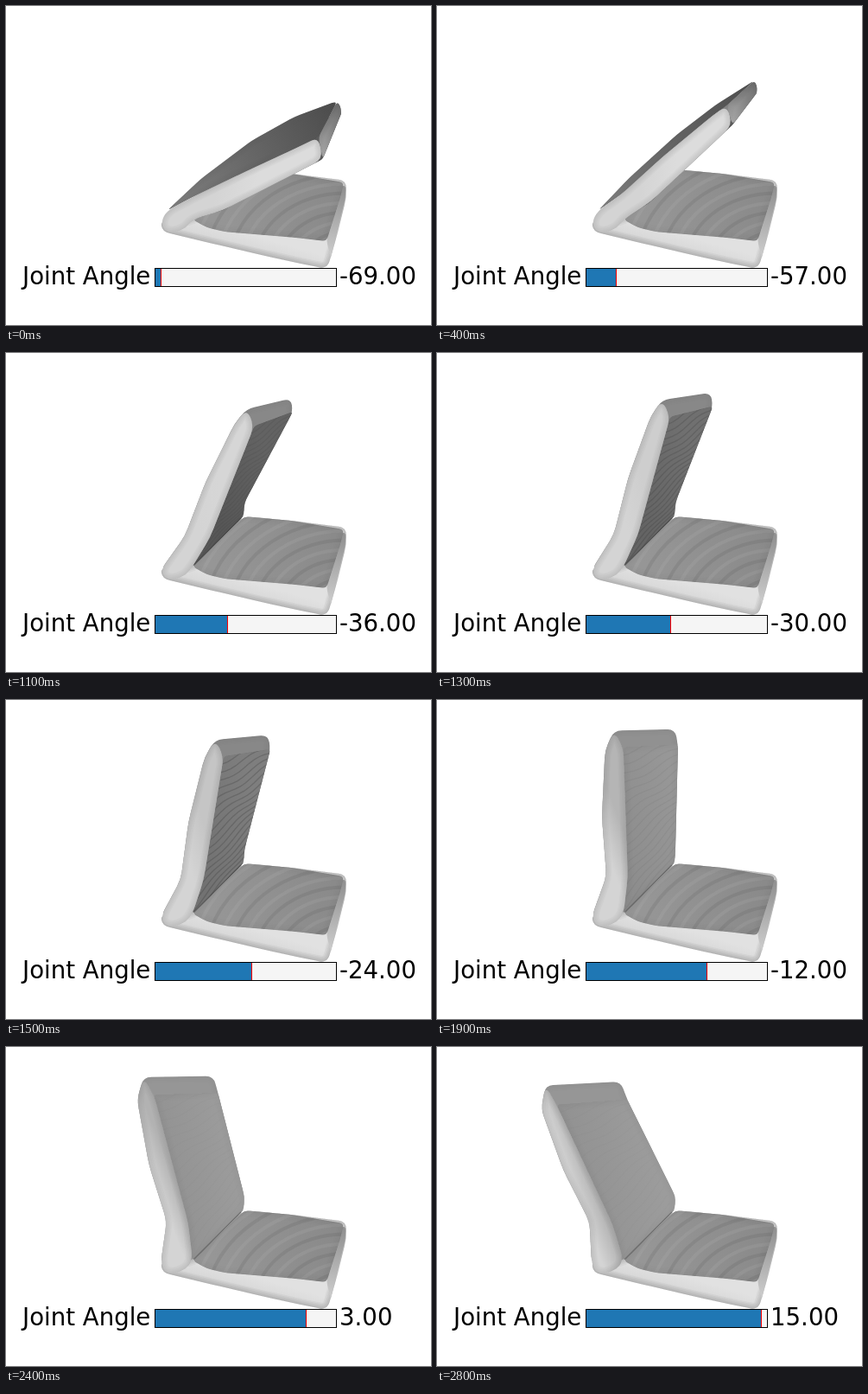
Recreate the animation shown at these times as an HTML page with a canvas. Size 492 by 369 pixels, loop 2.9 s.

```html
<!DOCTYPE html>
<html lang="en">
<head>
<meta charset="utf-8">
<title>Joint Angle</title>
<style>
  html, body { margin: 0; width: 100%; height: 100%; overflow: hidden; background: #fff; }
  canvas { display: block; width: 492px; height: 369px; }
</style>
</head>
<body>
<canvas id="stage"></canvas>
<script>
const STEP = 100, STEPS = 29;
const canvas = document.getElementById('stage');
const ctx = canvas.getContext('2d');
const ratio = window.devicePixelRatio || 1;
canvas.width = 492 * ratio;
canvas.height = 369 * ratio;
ctx.scale(ratio, ratio);

const HINGE = [179, 251], FOOT = [186, 237], FOLD = [216, 247];
const CORNER = [275, 189], FAR_LOW = [276, 173];

const gray = (n, a = 1) => `rgba(${n},${n},${n},${a})`;
const mix = (a, b, u) => a + (b - a) * u;
const between = (p, q, u) => [mix(p[0], q[0], u), mix(p[1], q[1], u)];

// Point on the line p-q, pushed sideways by d
function beside(p, q, u, d) {
  const [x, y] = between(p, q, u);
  const dx = q[0] - p[0], dy = q[1] - p[1], len = Math.hypot(dx, dy);
  return [x - d * dy / len, y + d * dx / len];
}

// A point turning on an ellipse about a pivot
const swing = (pivot, up, out) => t =>
  [0, 1].map(k => pivot[k] + up[k] * Math.cos(t) + out[k] * Math.sin(t));

const outerTop = swing([216, 251], [-56, -192], [-160, 24]);
const nearCap = swing([221, 238], [-53, -204], [-171, 14]);
const innerTop = swing([228, 275], [-48, -221], [-167, 20]);
const farCap = swing([264, 167], [-17, -134], [-135, 10]);
const farTop = swing([281, 184], [-29, -132], [-127, 16]);

// Closed polygon with its corners cut to curves
function rounded(pts, d) {
  const path = new Path2D();
  const toward = (p, q) => between(p, q, Math.min(0.5, d / (Math.hypot(q[0] - p[0], q[1] - p[1]) || 1)));
  pts.forEach((p, i) => {
    const start = toward(p, pts[(i + pts.length - 1) % pts.length]);
    const end = toward(p, pts[(i + 1) % pts.length]);
    if (i) path.lineTo(...start); else path.moveTo(...start);
    path.quadraticCurveTo(...p, ...end);
  });
  path.closePath();
  return path;
}

function solid(pts, d, fill, edge = 0, detail) {
  const path = rounded(pts, d);
  ctx.save();
  ctx.fillStyle = fill;
  ctx.fill(path);
  ctx.clip(path);
  if (detail) detail();
  if (edge) {
    ctx.strokeStyle = gray(70, edge);
    for (let w = 2; w <= 14; w += 3) {
      ctx.lineWidth = w;
      ctx.stroke(path);
    }
  }
  ctx.restore();
}

function ramp(p, q, from, to) {
  const g = ctx.createLinearGradient(...p, ...q);
  g.addColorStop(0, gray(Math.round(from)));
  g.addColorStop(1, gray(Math.round(to)));
  return g;
}

function seatGrain() {
  for (let i = 0; i < 12; i++) {
    const r = 32 + i * 13;
    ctx.beginPath();
    ctx.ellipse(392, 300, r * 1.08, r * 0.86, 0, Math.PI, Math.PI * 1.5);
    ctx.strokeStyle = i % 2 ? gray(85, 0.16) : gray(195, 0.12);
    ctx.lineWidth = 4;
    ctx.stroke();
  }
}

function drawSeat() {
  const outline = [[179, 248], [181, 261], [240, 275], [300, 289], [350, 300], [372, 304],
    [383, 266], [394, 222], [394, 202], [340, 195], [300, 191], CORNER, FOLD];
  const top = [FOLD, [276, 189], [330, 194], [391, 204], [388, 218], [371, 272],
    [335, 268], [252, 261], [232, 256]];
  solid(outline, 9, ramp([250, 255], [240, 290], 225, 205), 0.05);
  solid([[371, 271], [389, 208], [393, 208], [393, 222], [382, 266], [376, 292]], 4,
    ramp([380, 205], [374, 290], 140, 205));
  solid(top, 5, ramp([240, 240], [380, 230], 150, 138), 0.015, seatGrain);
}

function backGrain(angle, nearTop, top) {
  ctx.strokeStyle = gray(50, 0.02 + 0.24 * Math.exp(-(((angle + 26) / 10) ** 2)));
  ctx.lineWidth = 1.3;
  for (let i = 0; i < 19; i++) {
    const u = i / 16 - 0.1;
    const p = between(FOLD, nearTop, u), q = between(CORNER, top, u + 0.13);
    ctx.beginPath();
    for (let s = 0; s <= 1.01; s += 0.1) {
      const [x, y] = between(p, q, s);
      ctx.lineTo(x, y + 2.5 * Math.sin(s * 7 + i * 0.8));
    }
    ctx.stroke();
  }
}

function drawBack(angle) {
  const t = angle * Math.PI / 180;
  const [top, cap, inTop, rearCap, rearTop] =
    [outerTop, nearCap, innerTop, farCap, farTop].map(point => point(t));
  const bend = 35 * Math.cos(t) - 21;
  const low = beside(HINGE, top, 0.25, bend);
  const mid = beside(HINGE, top, 0.6, bend * 0.35 - 2);
  const inLow = beside(FOLD, inTop, 0.22, 5);
  const rearMid = between(FAR_LOW, rearTop, 0.5);
  const folded = angle < -45;

  // The inner face darkens as it turns down
  const turn = Math.min(1, Math.max(0, (-5 - angle) / 40));
  const shade = 150 - 65 * turn * turn * (3 - 2 * turn);

  solid([HINGE, low, mid, top, cap, rearCap, rearTop, rearMid, FAR_LOW, CORNER, FOLD], 9,
    gray(Math.round(Math.max(136, shade))), 0.015);
  solid([FOLD, inLow, inTop, rearTop, rearMid, FAR_LOW, CORNER], 4,
    ramp(mid, rearMid, shade - 6, shade + 6), 0.01,
    () => backGrain(angle, inTop, rearTop));

  if (folded) {
    const lift = 18 + (-69 - angle) / 2;
    const rim = [0.25, 0.5, 0.8].map(u => {
      const [x, y] = between(rearCap, FOOT, u);
      return [x, y - lift * 4 * u * (1 - u)];
    });
    solid([FOOT, low, mid, top, cap, rearCap, ...rim], 7,
      ramp([200, 225], rearCap, 125, 75), 0.015);
    solid([cap, rearCap, rearTop, inTop], 6, ramp(rearCap, inTop, 105, 175), 0.02);
  }

  const side = [HINGE, ...(folded ? [FOOT] : []), low, mid, top, cap, inTop, inLow,
    FOLD, [206, 259], [186, 263]];
  solid(side, 11,
    ramp(between(low, mid, 0.5), between(inLow, inTop, 0.3), 212, 275 - 0.65 * shade), 0.03);

  if (!folded) {
    ctx.beginPath();
    ctx.moveTo(217, 246);
    ctx.lineTo(272, 191);
    ctx.strokeStyle = gray(50, 0.4);
    ctx.lineWidth = 1.5;
    ctx.stroke();
  }
}

function drawSlider(angle) {
  const x = 172 + Math.round((angle + 72) * 7 / 3);
  ctx.fillStyle = '#f5f5f5';
  ctx.fillRect(172, 303, 211, 22);
  ctx.fillStyle = '#1f77b4';
  ctx.fillRect(172, 303, x - 172, 22);
  ctx.fillStyle = '#f00';
  ctx.fillRect(x, 303, 1, 22);
  ctx.strokeStyle = '#000';
  ctx.lineWidth = 1;
  ctx.strokeRect(172.5, 303.5, 210, 21);

  ctx.font = '27.6px "DejaVu Sans", sans-serif';
  ctx.fillStyle = '#000';
  ctx.textAlign = 'right';
  ctx.fillText('Joint Angle', 167.3, 322);
  ctx.textAlign = 'left';
  ctx.fillText(angle.toFixed(2), 386, 322);
}

let shown = -1;
function frame() {
  const step = Math.floor(performance.now() / STEP) % STEPS;
  if (step !== shown) {
    shown = step;
    const angle = -69 + 3 * step;
    ctx.fillStyle = '#fff';
    ctx.fillRect(0, 0, 492, 369);
    drawSeat();
    drawBack(angle);
    drawSlider(angle);
  }
  requestAnimationFrame(frame);
}
frame();
</script>
</body>
</html>
```
